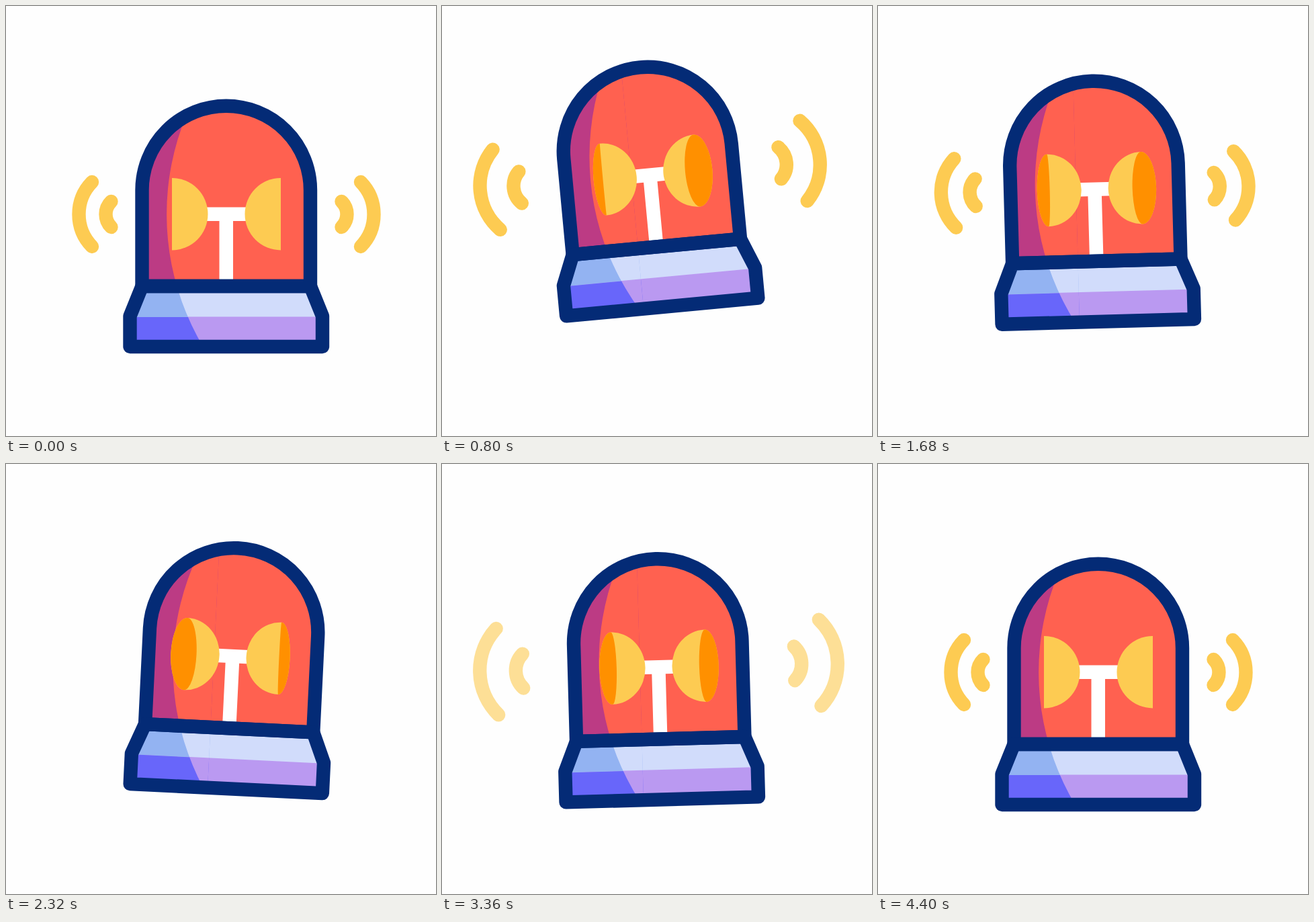
An HTML page that plays this animation: 640x640 px, repeating every 4.44 s.

```html
<!DOCTYPE html>
<html lang="en">
<head>
<meta charset="utf-8">
<title>Siren</title>
<style>
  html, body { margin: 0; width: 100%; height: 100%; overflow: hidden; background: #fefefe; }
  svg { display: block; width: 100%; height: 100%; }
</style>
</head>
<body>
<svg viewBox="0 0 640 640">
  <defs>
    <path id="dome" d="M202.5 417V274a125.25 125.25 0 0 1 250.5 0V417Z"/>
    <path id="base" d="M202.5 417H453L471 461.5V507H184.5V461.5Z"/>
    <clipPath id="domeClip"><use href="#dome"/></clipPath>
    <clipPath id="baseClip"><use href="#base"/></clipPath>
    <!-- everything left of a large circle is in shade -->
    <path id="shade" d="M150 100H300V700H150Z M624 -75a385 385 0 0 0 0 770a385 385 0 0 0 0 -770Z" clip-rule="evenodd"/>
    <clipPath id="shadeClip"><use href="#shade" clip-rule="evenodd"/></clipPath>
  </defs>
  <g id="siren">
    <g clip-path="url(#domeClip)">
      <path fill="#ff6150" d="M190 130H470V420H190Z"/>
      <path fill="#bc3b84" clip-path="url(#shadeClip)" d="M190 130H300V420H190Z"/>
    </g>
    <path fill="#fff" d="M290 299.5H366V320H338V412H317.5V320H290Z"/>
    <g id="lamps"></g>
    <g clip-path="url(#baseClip)">
      <path fill="#d1dcfb" d="M170 417H480V463H170Z"/>
      <path fill="#ba99f1" d="M170 462.5H480V510H170Z"/>
      <g clip-path="url(#shadeClip)">
        <path fill="#93b3f2" d="M170 417H300V463H170Z"/>
        <path fill="#6866fa" d="M170 463H300V510H170Z"/>
      </g>
    </g>
    <g fill="none" stroke="#042b76" stroke-width="20.4" stroke-linejoin="round">
      <use href="#dome"/>
      <use href="#base"/>
    </g>
    <g id="waves" fill="none" stroke="#fdcb52" stroke-width="20.4" stroke-linecap="round"></g>
  </g>
</svg>
<script>
const LOOP = 4440, STEP = 40, PERIOD = 1200;
const AXIS = 328, LAMP_Y = 309.7, LAMP_R = 53.7;
const SWING = [[0, 0], [680, -7.6], [1280, 7.6], [1900, -5.8], [2500, 5.7], [3120, -4.4], [3700, 2.8], [4400, 0]];

const $ = id => document.getElementById(id);
const addPath = (parent, fill) => {
  const path = document.createElementNS('http://www.w3.org/2000/svg', 'path');
  if (fill) path.setAttribute('fill', fill);
  return parent.appendChild(path);
};
const sides = [-1, 1].map(side => ({
  side,
  bowl: addPath($('lamps'), '#fdcb52'),
  mouth: addPath($('lamps'), '#ff9000'),
  outer: addPath($('waves')),
  inner: addPath($('waves')),
}));

const ramp = (t, from, to) => Math.min(1, Math.max(0, (t - from) / (to - from)));
const cosine = u => (1 - Math.cos(Math.PI * u)) / 2;
const soft = u => (u + cosine(u)) / 2;

function tilt(t) {
  const i = SWING.findIndex(([time]) => time > t);
  if (i < 1) return 0;
  const [t0, a] = SWING[i - 1], [t1, b] = SWING[i];
  return a + (b - a) * soft(ramp(t, t0, t1));
}

function lift(t) {
  const rise = 690;
  return t < rise ? -62 * soft(t / rise) : -62 * (1 - ramp(t, rise, 4400)) ** 1.65;
}

// Upright edge closed by two half ellipses: one outward, one toward the axis.
function lens(side, x, out, inward) {
  const top = LAMP_Y - LAMP_R, bottom = LAMP_Y + LAMP_R;
  const right = side > 0 ? 1 : 0;
  const back = inward < 0 ? 1 - right : right;
  return `M${x} ${top}A${out} ${LAMP_R} 0 0 ${right} ${x} ${bottom}` +
         `A${Math.abs(inward)} ${LAMP_R} 0 0 ${back} ${x} ${top}Z`;
}

function drawLamp({ side, bowl, mouth }, t) {
  const open = cosine(ramp(t, 0, 640)) * (1 - cosine(ramp(t, 3700, 4380)));
  const yaw = side * 11 * Math.cos(2 * Math.PI * (t - 680) / PERIOD);
  const x = AXIS + side * (81 - 11 * open);
  const out = open * (18.7 + 0.5 * yaw);
  bowl.setAttribute('d', lens(side, x, out, 53.5 - 3.5 * open));
  mouth.setAttribute('d', lens(side, x, out, open * (8.5 + yaw)));
}

function waveArc(side, x, half, radius, scale) {
  const px = AXIS + side * (81 + (x - 81) * scale);
  const h = half * scale, r = radius * scale;
  return `M${px} ${310 - h}A${r} ${r} 0 0 ${side > 0 ? 1 : 0} ${px} ${310 + h}`;
}

function waveState(t) {
  if (t >= 3 * PERIOD) return { scale: 1, opacity: ramp(t, 4200, 4360) };
  const phase = t % PERIOD;
  const fadeIn = t < PERIOD ? 1 : ramp(phase, 20, 160);
  return {
    scale: 1 + 0.338 * ramp(phase, 360, 960),
    opacity: fadeIn * (1 - ramp(phase, 880, 1080)),
  };
}

function draw(t) {
  $('siren').setAttribute('transform', `translate(0 ${lift(t)}) rotate(${tilt(t)} ${AXIS} 507)`);
  const { scale, opacity } = waveState(t);
  $('waves').setAttribute('opacity', opacity);
  for (const s of sides) {
    drawLamp(s, t);
    s.outer.setAttribute('d', waveArc(s.side, 200, 48, 68.8, scale));
    s.inner.setAttribute('d', waveArc(s.side, 171.5, 19, 26.6, scale));
  }
}

const start = performance.now();
function tick() {
  const t = (performance.now() - start) % LOOP;
  draw(Math.floor(t / STEP) * STEP);
  requestAnimationFrame(tick);
}
tick();
</script>
</body>
</html>
```
